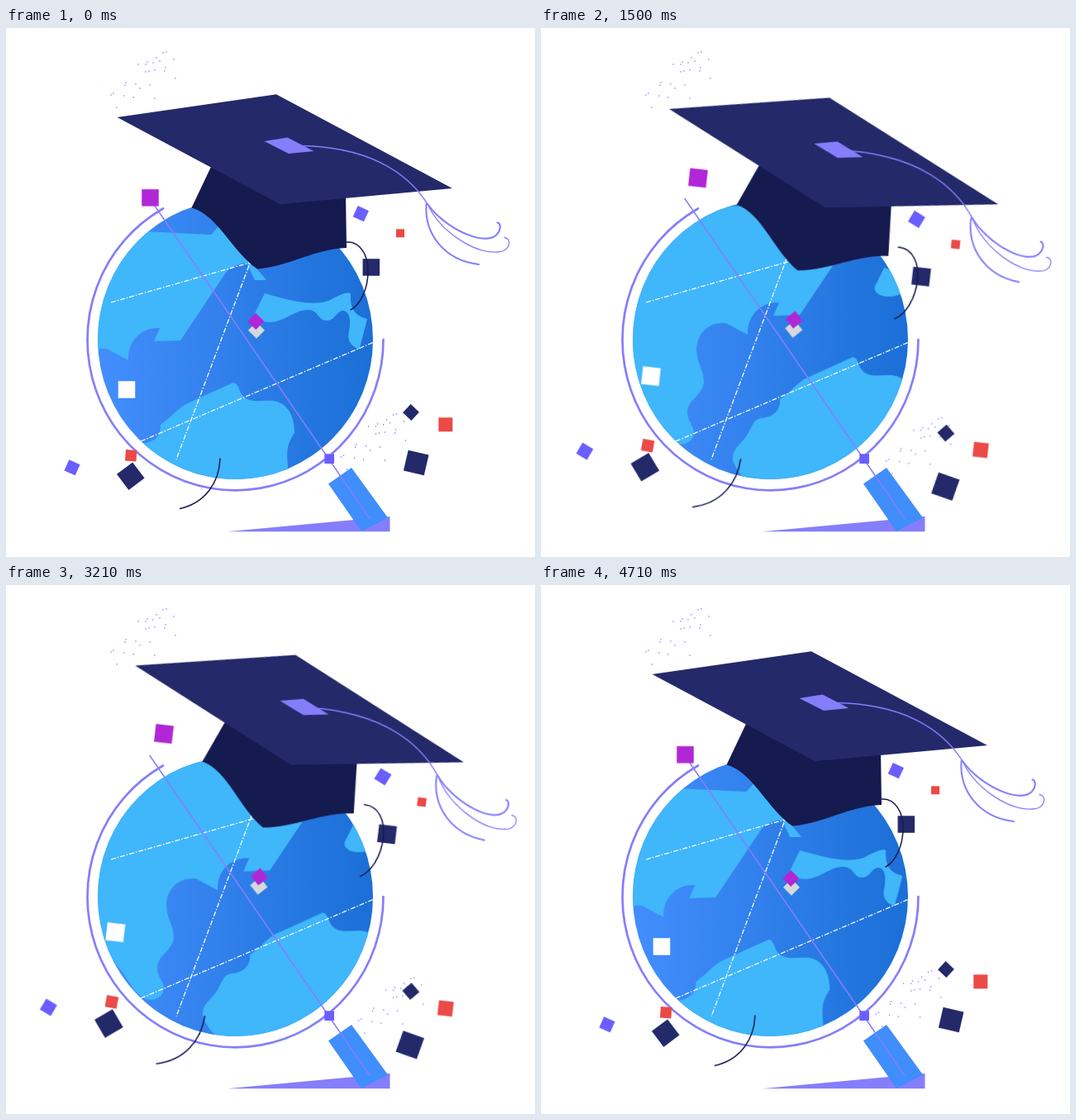
These frames come from a looping animation (640x640 px, 4.78 s). An HTML page:

```html
<!DOCTYPE html>
<html lang="en">
<head>
<meta charset="utf-8">
<title>Graduation globe</title>
<style>
  html, body { margin: 0; width: 100%; height: 100%; overflow: hidden; background: #fff; }
  svg { display: block; width: 100vw; height: 100vh; }

  .navy { fill: #24296a; }
  .dark { fill: #151a4f; }
  .lilac { fill: #857efb; }
  .blue { fill: #6a5eff; }
  .red { fill: #eb4a47; }
  .violet { fill: #b127d6; }
  .white { fill: #fff; }
  .grey { fill: #d5d8dc; }
  .land { fill: #40b6fb; }
  .line { fill: none; stroke: #857efb; stroke-linecap: round; stroke-width: 1.5; }
  .arc { fill: none; stroke: #151a4f; stroke-width: 1.5; stroke-linecap: round; }
  .dash { fill: none; stroke: #fff; stroke-width: 1.3; stroke-dasharray: 6 2 1.5 2; }
  .dots { fill: none; stroke: #6a5eff; stroke-width: 1.4; stroke-linecap: round; }

  .sway { animation: 2390ms cubic-bezier(.37, 0, .63, 1) infinite alternate; }
  #land { animation-name: slide; }
  #cap { animation-name: tilt; transform-origin: 282px 384px; }
  #confetti { animation-name: swirl; transform-origin: 305.2px 390.2px; }
  #spray { animation: drift 4780ms cubic-bezier(.37, 0, .63, 1) infinite; }

  @keyframes slide { to { transform: translate(146.4px, -44.2px); } }
  @keyframes tilt { to { transform: rotate(6deg); } }
  @keyframes swirl { to { transform: rotate(9.13deg) scale(1.0764); } }
  @keyframes drift { 60% { transform: translate(23px, 8.8px); } }
</style>
</head>
<body>
<svg viewBox="0 0 640 640">
  <defs>
    <linearGradient id="sea">
      <stop offset="0" stop-color="#438efd"/>
      <stop offset="1" stop-color="#1b6fd6"/>
    </linearGradient>
    <clipPath id="disc"><ellipse cx="277.5" cy="377" rx="166.5" ry="169"/></clipPath>
    <rect id="sq" x="-.5" y="-.5" width="1" height="1"/>
    <path id="dots" d="M190 30h0M194 29h0M182 36h0M171 41h0M169 44h0M203 38h0M160 44h0M186 40h0M178 42h0M193 48h0M192 52h0M180 51h0M173 52h0M169 53h0M145 66h0M144 69h0M157 68h0M162 73h0M174 69h0M205 61h0M130 79h0M127 81h0M143 82h0M154 84h0M180 85h0M134 96h0"/>
  </defs>

  <use href="#dots" class="dots"/>

  <!-- globe -->
  <g clip-path="url(#disc)">
    <rect x="111" y="208" width="333" height="338" fill="url(#sea)"/>
    <g id="land" class="land sway">
      <path d="M-80 246L174 246.5L248 250L258 239L290 275L315 305L301 305L291 284
        Q273 286 266 296L211 378L179 379L186 363
        C164 362 147 378 148 402L122 388
        C100 385 86 402 86 420C87 438 95 444 95 460C92 476 75 481 75 496
        C75 507 83 512 83 521C82 532 70 537 60 533C48 528 42 513 32 500
        C18 482 0 470 -24 468L-80 468Z"/>
      <path d="M313 321C340 329 370 337 390 330C403 323 416 317 417 322
        C416 340 422 348 437 352L427.500 389C413 383 413 374 415.500 364
        C417 354 416 343 408 342C400 342 398 354 388 354C377 354 379 341 365 341
        C346 341 332 362 308 354C301 350 300 346 303 341Z"/>
      <path d="M275 429C284 431 280 441 290 448C303 455 316 448 328 452
        C343 457 349 472 349 490C341 502 339 508 341 530L341 660L220 660
        C200 625 182 598 160 587C145 578 138 572 132 559
        C125 545 137 536 143 529C153 518 152 506 163 503C176 502 188 496 187 480
        C205 467 208 459 222 453Z"/>
    </g>
  </g>
  <path class="dash" d="M127 332L312 279M302 266L206 522M163 500L444 380.500"/>
  <path class="line" style="stroke-width:2.7" d="M190 218.500A179 182 0 1 0 456.500 377"/>

  <!-- stand -->
  <path class="lilac" d="M268 609.300L464.500 591V609.300Z"/>
  <path fill="#408dfc" d="M390 551.500L418 532L462 592.500L430 609Z"/>
  <path class="line" d="M174 206.500L440 593.500"/>
  <rect class="blue" x="385.300" y="515.300" width="11.700" height="11.700"/>

  <g id="spray"><use href="#dots" class="dots" x="278.500" y="438"/></g>

  <!-- mortarboard -->
  <g id="cap" class="sway">
    <path class="dark" d="M248 168L224.500 217.500C256 226 274 271 304 291.500C344 288 374 267 412 266L411 200L331 205Z"/>
    <path class="navy" d="M134.500 108L327 80.300L540 194L331.500 213.200Z"/>
    <path class="lilac" d="M312.500 137L340.500 132.500L372.500 149L342 152Z"/>
    <path class="line" d="M350 142.500C438 142 486 175 510 213C531 243 584 268 596 247C600 239 596 235 594.500 235.500"/>
    <path class="line" style="stroke-width:2" d="M508.500 213C506 249 530 281 572 286M510 213C531 243 584 268 596 247C600 239 596 235 594.500 235.500"/>
    <path class="line" style="stroke-width:1.300" d="M510 213C525 246 566 273 595 271C611 270 612 254 603 253.500"/>
  </g>

  <!-- confetti -->
  <g id="confetti" class="sway">
    <use href="#sq" class="violet" transform="translate(174.500 205.300) scale(20.500)"/>
    <use href="#sq" class="blue" transform="translate(429.300 224.700) rotate(25) scale(14.500)"/>
    <use href="#sq" class="red" transform="translate(477 248.300) scale(10)"/>
    <use href="#sq" class="navy" transform="translate(441.800 289.500) scale(20.500)"/>
    <use href="#sq" class="navy" transform="translate(490 465) rotate(43) scale(14)"/>
    <use href="#sq" class="red" transform="translate(531.800 479.800) scale(17)"/>
    <use href="#sq" class="navy" transform="translate(496.200 526) rotate(13) scale(25.500)"/>
    <use href="#sq" class="red" transform="translate(151.200 517.200) rotate(4) scale(13.500)"/>
    <use href="#sq" class="navy" transform="translate(150.800 542.200) rotate(-37) scale(24)"/>
    <use href="#sq" class="blue" transform="translate(80 531.800) rotate(24) scale(14.500)"/>
    <use href="#sq" class="white" transform="translate(146 437.500) scale(20.500)"/>
    <use href="#sq" class="grey" transform="translate(303 365.700) rotate(45) scale(14.200)"/>
    <use href="#sq" class="violet" transform="translate(302.300 355) rotate(45) scale(14.200)"/>
    <path class="arc" d="M412 259C428 258 438 274 438 294C438 317 428 335 417 341M259 521C258 549 242 574 210.500 581.500"/>
  </g>
</svg>
</body>
</html>
```
